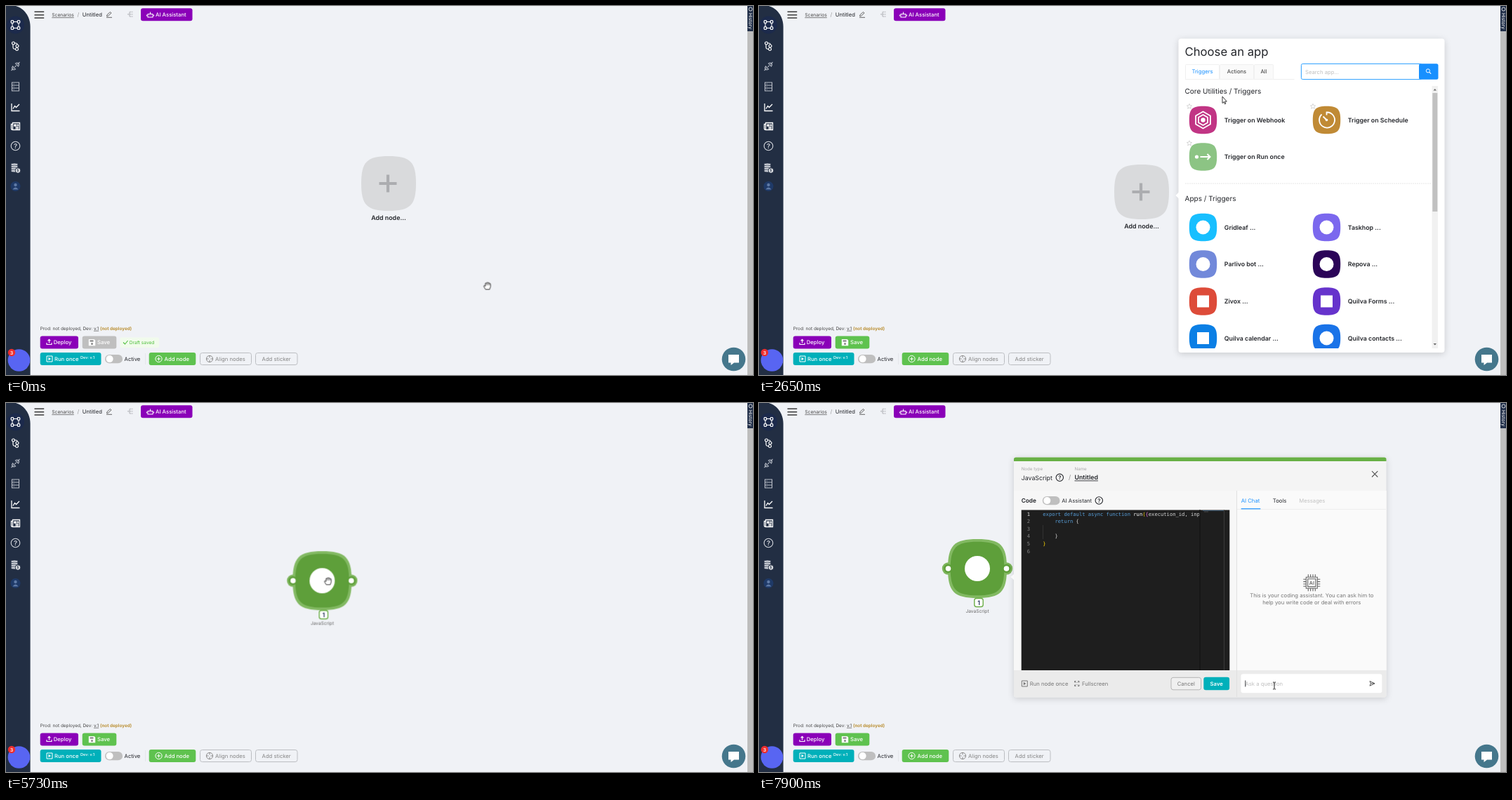
An HTML page for the animation above (8000 ms loop, 1064 px wide and 526 px high).

```html
<!DOCTYPE html>
<html lang="en">
<head>
<meta charset="utf-8">
<title>Scenario editor</title>
<style>
html, body { margin: 0; width: 100%; height: 100%; overflow: hidden; background: #f0f2f6; }
svg { display: block; width: 1064px; height: 526px; font-family: Inter, Roboto, sans-serif; text-rendering: geometricPrecision; }
.card { filter: drop-shadow(0 2px 5px rgba(0, 0, 0, .16)); }
.focus { filter: drop-shadow(0 0 1px rgba(24, 144, 255, .3)); }
.mono { font-family: "DejaVu Sans Mono", "Noto Sans Mono", monospace; white-space: pre; }
#picker { transform-origin: 597px 270px; }
#dialog { transform-origin: 363px 248px; }
</style>
</head>
<body>
<svg id="stage" viewBox="0 0 1064 526"></svg>
<script>
const LOOP = 8000;
const INK = '#24262b', BLUE = '#1890ff', GREEN = '#5fc24f', PURPLE = '#8a00b8', TEAL = '#00b0ba', GREY = '#bfbfbf';
const BOLD = 'font-weight="600"', MEDIUM = 'font-weight="500"', MIDDLE = 'text-anchor="middle"';

// Drawing helpers; text is placed by the middle of its capitals.
const text = (x, y, s, size = 7.7, fill = INK, more = '') =>
  `<text x="${x}" y="${y + size * .36}" font-size="${size}" fill="${fill}" ${more}>${s}</text>`;
const rect = (x, y, w, h, fill, r = 0, more = '') =>
  `<rect x="${x}" y="${y}" width="${w}" height="${h}" rx="${r}" fill="${fill}" ${more}/>`;
const circle = (x, y, r, fill, more = '') => `<circle cx="${x}" cy="${y}" r="${r}" fill="${fill}" ${more}/>`;
const line = (d, color, width = 1, more = '') =>
  `<path d="${d}" fill="none" stroke="${color}" stroke-width="${width}" ${more}/>`;
const at = (x, y, s, id = '') => `<g ${id && `id="${id}"`} transform="translate(${x} ${y})">${s}</g>`;
const group = (id, s) => `<g id="${id}">${s}</g>`;
const squircle = (r, fill, more = '') => {
  const k = r * .79;
  return `<path d="M${-r} 0C${-r} ${-k} ${-k} ${-r} 0 ${-r}S${r} ${-k} ${r} 0 ${k} ${r} 0 ${r} ${-r} ${k} ${-r} 0" fill="${fill}" ${more}/>`;
};
const hexagon = r => 'M' + [0, 1, 2, 3, 4, 5].map(i => {
  const a = (i + .5) * Math.PI / 3;
  return `${(r * Math.cos(a)).toFixed(2)} ${(r * Math.sin(a)).toFixed(2)}`;
}).join('L') + 'Z';
const chip = (color, width = 1.2) => {
  let pins = '';
  for (const p of [-5, -1.7, 1.7, 5]) pins += `M${p} -12V-8M${p} 8V12M-12 ${p}H-8M8 ${p}H12`;
  return line(pins + 'M-8-8H8V8H-8ZM-5.6-5.6H5.6V5.6H-5.6Z', color, width) +
    text(0, 0, 'AI', 7, color, MIDDLE + BOLD);
};
const help = (x, y, r, color) =>
  circle(x, y, r, 'none', `stroke="${color}" stroke-width="1.1"`) + text(x, y, '?', r * 1.5, color, MIDDLE + BOLD);

const icons = {
  hook: line(hexagon(12) + hexagon(7.5), '#fff', 1.8) + circle(0, 0, 3.2, '#fff'),
  clock: line('M-7-8A11 11 0 1 0 0-11V-7M0 0L-5-5', '#fff', 1.8) + circle(0, 0, 1.8, '#fff'),
  arrow: circle(-9, 0, 2.6, '#fff') + line('M-4 0H10M6-4L10 0 6 4', '#fff', 2),
  browser: line('M-12.5-11.5H12.5V11.5H-12.5ZM-12.5-6H12.5M-10-8.8H-8M-6-8.8H-4M-4-1L-7.5 2.5-4 6M4-1L7.5 2.5 4 6M1.5-2L-1.5 7', '#fff', 1.3),
  code: line('M-4-5.5L-9.5 0-4 5.5M4-5.5L9.5 0 4 5.5', '#fff', 1.8),
  chip: chip('#fff'),
  dot: circle(0, 0, 10, '#fff'),
  box: rect(-8.5, -8.5, 17, 17, '#fff')
};
const star = (x, y) =>
  at(x, y, line('M0-3.6L1.1-1.2 3.6-1 1.7.7 2.3 3.3 0 1.9-2.3 3.3-1.7.7-3.6-1-1.1-1.2Z', '#c4c4c4', .7));
const COLS = [632.5, 808.5], ROWS = [162.5, 215, 315.5, 368, 421, 473.5];
const app = (x, y, color, icon, label, starred, id = '') => {
  const lines = label.split('|');
  return at(x, y, squircle(19.7, color) + icons[icon]) + (starred ? star(x - 19.5, y - 19.5) : '') +
    `<g ${id && `id="${id}"`} fill="${INK}">` +
    lines.map((s, i) => text(x + 30.3, y + (i - (lines.length - 1) / 2) * 11.5, s, 8.8, 'inherit', BOLD)).join('') + '</g>';
};

function popup(id, top, bottom, right, title, hint, tab, focused, body) {
  const y = top + 36.5, tabs = [['Triggers', 607, 49], ['Actions', 656, 49], ['All', 705, 28]];
  return group(id,
    rect(597.5, top, right - 597.5, bottom - top, '#fff', 4, 'class="card"') +
    '<path d="M593.5 270L598 265.5V274.5Z" fill="#fff"/>' +
    text(606.5, top + 18.5, title, 16.7) +
    line(`M607 ${y + 21.5}H${right - 214}`, '#efefef') +
    tabs.map(([s, x, w], i) =>
      rect(x + .5, y + .5, w - 1, 21, i == tab ? '#fff' : '#fafafa', 1, 'stroke="#f0f0f0"') +
      text(x + w / 2, y + 10.7, s, 7.7, i == tab ? BLUE : '#333', MIDDLE)).join('') +
    rect(right - 204, y - .5, 171, 22, '#fff', 2, focused ? 'stroke="#40a9ff" class="focus"' : 'stroke="#d5d5d5"') +
    text(right - 198.5, y + 10.8, hint, 7.7, '#bfbfbf') +
    rect(right - 36.5, y - .8, 27.5, 22.5, BLUE, 2.5) +
    at(right - 23, y + 10, circle(-.6, -.6, 2.6, 'none', 'stroke="#fff"') + line('M1.3 1.3L3.7 3.7', '#fff', 1.2)) + body);
}

function catalogue(id, kind, tab, thumb, focused, apps) {
  return popup(id, 46.5, 494, 976.5, 'Choose an app', 'Search app...', tab, focused,
    text(606.5, 121.5, 'Core Utilities / ' + kind, 10) + text(606.5, 274.5, 'Apps / ' + kind, 10) +
    line('M607 253H957', '#e6e6e6', 1, 'stroke-dasharray="2 1"') +
    rect(958.5, 114, 8.5, 374, '#f1f1f1') + rect(959.3, 124, 7, thumb, '#c1c1c1') +
    '<path d="M960.5 120.5H965L962.8 118ZM960.5 481H965L962.8 483.5Z" fill="#666"/>' +
    '<g clip-path="url(#list)">' +
    apps.map(([c, r, ...rest]) => app(COLS[c], ROWS[r], ...rest)).join('') + '</g>');
}

const triggers = catalogue('triggers', 'Triggers', 0, 169, true, [
  [0, 0, '#c13584', 'hook', 'Trigger on Webhook', 1],
  [1, 0, '#c08a35', 'clock', 'Trigger on Schedule', 1],
  [0, 1, '#8cc484', 'arrow', 'Trigger on Run once', 1],
  [0, 2, '#18bfff', 'dot', 'Gridleaf ...'],
  [1, 2, '#7b68ee', 'dot', 'Taskhop ...'],
  [0, 3, '#7289da', 'dot', 'Parlivo bot ...'],
  [1, 3, '#2b0458', 'dot', 'Repova ...'],
  [0, 4, '#dd4b39', 'box', 'Zivox ...'],
  [1, 4, '#6633cc', 'box', 'Quilva Forms ...'],
  [0, 5, '#0b7fe5', 'box', 'Quilva calendar ...'],
  [1, 5, '#1a73e8', 'dot', 'Quilva contacts ...']
]);
const DARK = '#06444d', LEAF = '#68b045';
const actions = catalogue('actions', 'Actions', 1, 97, false, [
  [0, 0, '#c13584', 'hook', 'Webhook response', 1],
  [1, 0, LEAF, 'browser', 'Code ...', 0, 'codeLabel'],
  [0, 1, LEAF, 'code', 'Other tools ...'],
  [0, 2, DARK, 'chip', 'AI Talkivo Alternatives|...'],
  [1, 2, '#76b900', 'dot', 'AI Speech-To-Text ...'],
  [0, 3, DARK, 'chip', 'AI Tools ...'],
  [1, 3, DARK, 'chip', 'AI: Automatic Speech|Recognition ...'],
  [0, 4, DARK, 'chip', 'AI: Image Classification|...'],
  [1, 4, DARK, 'chip', 'AI: Image To Text ...'],
  [0, 5, DARK, 'chip', 'AI: Object Detection ...'],
  [1, 5, DARK, 'chip', 'AI: Summarization ...']
]);
const codeApps = popup('codeApps', 162.8, 378, 967, 'Code', 'Search in Code...', 1, true,
  line('M615.5 239.5H608.5M611.5 236L608 239.5 611.5 243', INK) + text(618.5, 239.5, 'Back') +
  text(606.5, 256.3, 'Actions', 9.9) + line('M607 334.5H958', '#ececec') +
  app(COLS[0], 297, LEAF, 'browser', 'Headless browser', 1) +
  app(COLS[1], 297, LEAF, 'dot', 'JavaScript', 1, 'jsLabel'));

const play = (x, y, c) => at(x, y, line('M-4-4H4V4H-4Z', c) + `<path d="M-1.5-2.2L2 0-1.5 2.2Z" fill="${c}"/>`);
const sidebar =
  '<path d="M0 0H14C25 3 34.6 14 34.6 30V526H0Z" fill="#222e43"/>' + circle(13.5, 27, 12.5, '#1c2a4c') +
  at(13.5, 27, line('M-3-4.5H3M-3 4.5H3M-4.5-3V3M4.5-3V3', '#fff', 1.1) +
    [[-4.5, -4.5], [4.5, -4.5], [-4.5, 4.5], [4.5, 4.5]].map(([x, y]) =>
      rect(x - 1.8, y - 1.8, 3.6, 3.6, 'none', 1, 'stroke="#fff" stroke-width="1.2"')).join('')) +
  at(13, 57, [[-2.5, -4], [3, 0], [2.5, 4.5]].map(([x, y]) =>
    circle(x, y, 2, 'none', 'stroke="#fff" stroke-width="1.2"')).join('') + line('M-.5-4H1Q3-4 3-2M-3-2V2Q-3 4.5.5 4.5', '#fff', 1.2)) +
  at(13.5, 86, line('M-6 6L-3 3M6-6L3-3M-4 0L0 4-2 5Q-5 5-5 2ZM4 0L0-4 2-5Q5-5 5-2ZM-1 1L1-1', '#aeb4bf', 1.1)) +
  at(13.5, 115, line('M-5-6H5V6H-5ZM-5-2H5M-5 2H5M-3-4H-2M-3 0H-2M-3 4H-2', '#b8bdc7', 1.1)) +
  at(13.5, 144.5, line('M-5.5-5.5V5H6M-3.5 2L-1-2 1 0 5.5-4.5', '#fff', 1.3)) +
  at(13.5, 171.5, line('M-4-5H6V5H-4ZM-4-3H-6V3Q-6 5-4 5M0 1.5H4.5M0 3.3H4.5', '#fff', 1.3) + rect(-2.3, -3, 4, 3.2, '#fff') + rect(2.6, -3, 2, 3, '#fff')) +
  help(13.5, 199.5, 6.3, '#d6d9df') +
  at(13.5, 231, [-5, -2, 1, 4].map(y => `<ellipse cx="-1.5" cy="${y}" rx="5" ry="1.9" fill="#c9cdd5" stroke="#222e43" stroke-width=".6"/>`).join('') +
    circle(3.5, 3.5, 3.8, '#e3e5e9', 'stroke="#222e43"') + text(3.5, 3.5, '$', 5, '#222e43', MIDDLE + BOLD)) +
  circle(13.5, 257, 7, '#1f3a68') + circle(13.5, 255, 2.2, '#5f7aa6') + '<path d="M9.5 261.5Q13.5 255.5 17.5 261.5Z" fill="#5f7aa6"/>' +
  circle(18.5, 505, 15.8, '#5865f2') + circle(8, 494, 5.2, '#ee2d2d') + text(8, 494, '3', 7, '#fff', MIDDLE + BOLD);

const header =
  line('M40.5 8.3H54.2M40.5 12.7H54.2M40.5 17H54.2', '#3c3c3c', 1.5) +
  text(65.3, 13, 'Scenarios', 6.7, '#444', 'text-decoration="underline"') + text(101.5, 12.7, '/', 7.7, '#999') +
  text(108.7, 12.7, 'Untitled') +
  line('M143.5 14.5L144 12.5 148.5 8.5 150 10 145.5 14.2ZM143 16.3H151', '#555', .9) +
  line('M173 11.7H176M176 8.5V15M176 8.5H178M176 11.7H178M176 15H178M178.5 8.5H180.5M178.5 11.7H180.5M178.5 15H180.5', '#c3c5ca', 1.5) +
  rect(192, 3.2, 73.5, 18, PURPLE, 3) +
  at(205.5, 12.5, line('M-3.5-1H3.5V3.5H-3.5ZM0-1V-4M-5 0V2M5 0V2M-1.5 1H-1M1 1H1.5', '#fff', 1.1)) +
  text(213, 12.5, 'AI Assistant', 7.7, '#fff', MEDIUM) +
  rect(1056, 0, 8, 526, '#bdbdbd') + rect(1056, 0, 8, 36, '#22304a') +
  `<g transform="translate(1060.5 0) rotate(90)">${text(10, 0, 'History', 6.8, '#fff')}${circle(4.5, 0, 2.5, 'none', 'stroke="#fff" stroke-width=".8"')}</g>`;

const footer =
  text(48.7, 459.5, 'Prod: not deployed, Dev: <tspan text-decoration="underline">v.1</tspan> <tspan font-weight="600" fill="#b5851f">(not deployed)</tspan>', 6.4, '#444') +
  rect(48.7, 470.5, 54.3, 18, PURPLE, 3) +
  at(61.5, 479, line('M-3.5 1V3.5H3.5V1M0 1.5V-3.5M-2-1.7L0-3.7 2-1.7', '#fff', 1.1)) + text(67.8, 479.7, 'Deploy', 7.7, '#fff', MEDIUM) +
  `<rect id="save" x="108.7" y="470.5" width="48.6" height="18" rx="3" fill="${GREY}"/>` +
  at(122.5, 479.6, '<path d="M-4.7-4.7H3L4.7-3V4.7H-4.7Z" fill="#fff"/><path d="M-3-3.3H2V-1H-3Z" fill="#888"/>' + circle(0, 2, 1.5, '#888')) +
  text(130, 479.7, 'Save', 7.7, '#fff', MEDIUM) +
  group('draft', rect(162.5, 472.5, 55.5, 14.5, '#f1fbec', 2) + line('M167 479.5L169.5 482 173.5 477', '#4fbf3c', 1.1) + text(175.7, 479.7, 'Draft saved', 6.6, '#4fbf3c')) +
  rect(48.7, 494, 86.8, 18, TEAL, 3) + play(62, 503, '#fff') + text(69, 503.5, 'Run once', 7.7, '#fff', MEDIUM) +
  text(106, 501, 'Dev: v.1', 5.6, '#fff', MEDIUM) +
  rect(141, 497, 25, 12.3, GREY, 6.15) + circle(147.6, 503.1, 5, '#fff') + text(168.6, 503.2, 'Active') +
  line('M198.5 495V511', '#e4e6ea') +
  rect(203.7, 494, 66.6, 18, GREEN, 3) + circle(217.5, 503, 4.6, 'none', 'stroke="#fff"') + line('M215 503H220M217.5 500.5V505.5', '#fff') +
  text(225.5, 503.2, 'Add node', 7.7, '#fff', MEDIUM) +
  rect(276.5, 494.5, 73, 17, 'none', 3, 'stroke="#bcbec2"') + circle(290, 503, 4.6, 'none', 'stroke="#888"') +
  line('M290 498.5V501.5M290 504.5V507.5M285.5 503H288.5M291.5 503H294.5', '#888') + text(298, 503.2, 'Align nodes', 7.7, '#858585') +
  rect(355.5, 494.5, 59.5, 17, 'none', 3, 'stroke="#bcbec2"') + text(364.6, 503.2, 'Add sticker', 7.7, '#858585') +
  circle(1036.5, 503.5, 16.8, '#45778c') + '<path d="M1029 497H1044V508.5H1037L1032.5 512V508.5H1029Z" fill="#fff"/>';

const addNode = group('addNode', at(545, 253,
  group('addHover', squircle(39, 'none', 'stroke="#e1e2e3" stroke-width="4"')) + squircle(39, '#d9dadc') +
  line('M-1-12.5V12.5M-13.5 0H11.5', '#acadb0', 4.2) +
  text(0, 48.8, 'Add node...', 8.9, INK, MIDDLE + BOLD)));

const jsNode = group('jsNode',
  circle(-41.5, 0, 8.7, '#7db55b') + circle(41.5, 0, 8.7, '#7db55b') +
  squircle(42, '#82b962') + squircle(38.3, '#5e9f3a') +
  circle(-41.5, 0, 6.2, '#5e9f3a') + circle(41.5, 0, 6.2, '#5e9f3a') +
  circle(-41.5, 0, 3.8, '#fff') + circle(41.5, 0, 3.8, '#fff') + circle(0, 0, 18, '#fff') +
  rect(-4.2, 42.5, 12.4, 12, '#fff', 3, 'stroke="#6cae48" stroke-width="1.4"') +
  text(2, 48.6, '1', 8.8, '#1c2b50', MIDDLE + BOLD) + text(0, 61, 'JavaScript', 6.6, '#666', MIDDLE));

const span = (color, s) => `<tspan fill="${color}">${s}</tspan>`;
const source = [
  span('#569cd6', 'export default async function ') + span('#fff', 'run') + span('#ffd700', '(') + span('#da70d6', '{') + 'execution_id, inp',
  '    ' + span('#569cd6', 'return') + ' {', '', '    }', span('#ffd700', '}'), ''
];
const dialog = group('dialog',
  '<g class="card">' + rect(363, 77.5, 530.5, 342, '#f4f4f4', 3) + '</g>' +
  '<path d="M363 83V80Q363 77.5 366 77.5H890.5Q893.5 77.5 893.5 80V83Z" fill="#68b045"/>' +
  '<path d="M358.5 248L363.5 243.5V252.5Z" fill="#fafafa"/>' +
  rect(363, 125, 530.5, 256, '#f7f7f7') + rect(681, 125, 212.5, 256, '#fafafa') +
  '<path d="M363 381H893.5V416.5Q893.5 419.5 890.5 419.5H366Q363 419.5 363 416.5Z" fill="#ebebeb"/>' +
  line('M680.5 125V419', '#e0e0e0') + line('M681 151.5H893', '#eee') +
  text(373.7, 93.7, 'Node type', 6.2, '#aaa') + text(449.5, 93.7, 'Name', 6.2, '#aaa') +
  text(373.7, 106.5, 'JavaScript', 8.8) + help(428.3, 106.3, 5.2, INK) + text(441, 106.3, '/', 8.8, '#888') +
  text(449.5, 106.3, 'Untitled', 8.8, INK, BOLD + ' text-decoration="underline"') +
  line('M873 97.2L881.3 105.5M881.3 97.2L873 105.5', '#555', 1.1) +
  text(373.7, 139.2, 'Code', 8.3, INK, BOLD) + rect(403.8, 133, 24.7, 12.3, GREY, 6.15) + circle(410.3, 139.1, 5, '#fff') +
  text(431.3, 139.2, 'AI Assistant') + help(484.3, 139, 5.2, INK) +
  rect(373.7, 152.5, 296.6, 228.5, '#1e1e1e') + line('M628 152.5V381', '#171717', 2) + line('M662.5 152.5V381', '#3a3a3a') +
  line('M404.5 174V194', '#404040', .6) + line('M632 153.5H662', '#365a78', .8) + line('M634 155H640', '#555', .8) +
  '<g clip-path="url(#editor)">' + source.map((s, i) => {
    const y = 158 + i * 10.6;
    return text(386, y, i + 1, 7.15, i ? '#858585' : '#e0e0e0', 'class="mono" text-anchor="end"') +
      text(404.3, y, s, 7.15, '#d4d4d4', 'class="mono"');
  }).join('') + '</g>' +
  play(378.3, 400, '#777') + text(385.7, 400.2, 'Run node once', 7.7, '#777') +
  line('M449.5 398.5V396.5H451.5M454 396.5H456V398.5M456 401.5V403.5H454M451.5 403.5H449.5V401.5M450 397L452 399M455.5 397L453.5 399M450 403L452 401M455.5 403L453.5 401', '#777', .9) +
  text(460, 400.2, 'Fullscreen', 7.7, '#777') +
  rect(587, 391.3, 42.6, 17.5, '#f0f0f0', 3, 'stroke="#b5b5b5"') + text(608.3, 400.2, 'Cancel', 7.7, '#777', MIDDLE) +
  rect(633.3, 390.8, 36.8, 18.4, TEAL, 3) + text(651.7, 400.2, 'Save', 7.7, '#fff', MIDDLE + BOLD) +
  text(686.7, 139, 'AI Chat', 7.7, BLUE) + text(731.8, 139, 'Tools') + text(769.3, 139, 'Messages', 7.7, '#c2c2c2') +
  line('M686.7 150.8H714.3', BLUE, 1.2) + at(787.3, 256.3, chip('#666', 1.1)) +
  text(787.3, 274, 'This is your coding assistant. You can ask him to', 7.7, '#777', MIDDLE) +
  text(787.3, 284.3, 'help you write code or deal with errors', 7.7, '#777', MIDDLE) +
  rect(686.5, 386.3, 200.8, 27, '#fff', 3) + text(692.5, 400.2, 'Ask a question', 7.7, GREY) +
  line('M870 396.5L877 399.8 870 403.2 871.3 399.8ZM871.3 399.8H877', '#444', .9));

const hand = d => `<path d="${d}" fill="#fff" stroke="#222" stroke-width=".9" stroke-linejoin="round"/>`;
const cursor = group('cursor',
  group('click', circle(0, 0, 6, '#e0d800', 'opacity=".6"')) +
  group('grab', hand('M-2.5 5.5L-4.8 1.5Q-5.3 0-4 0L-2.8 1V-3Q-2-4.7-1-3.2-.3-5.8 1-3.6 2.3-5.2 3-3 4.7-3.5 4.7-1.5V1.5L3.3 5.5Z') +
    line('M-1-3.2V-.5M1-3.6V-.5M3-3V-.5', '#222', .7)) +
  group('arrow', hand('M0 0V9.5L2.1 7.6 3.5 10.8 4.9 10.1 3.5 7.1H6.3Z')) +
  group('pointer', hand('M0 12.5L-2.5 8.5Q-2.5 6.8-.8 8V1Q0-.8 1 1V4.5Q2.2 3.7 2.8 5 4 4.3 4.6 5.5 6.4 5 6.4 7V9.5L5.3 12.5Z')) +
  group('beam', line('M-2-4.5Q0-4.5 0-3.5 0-4.5 2-4.5M0-3.5V4.5M-2 5.5Q0 5.5 0 4.5 0 5.5 2 5.5', '#222', 1)));

const $ = id => document.getElementById(id);
$('stage').innerHTML =
  '<clipPath id="list"><path d="M598 114H958V488H598Z"/></clipPath>' +
  '<clipPath id="editor"><path d="M374 152H627.5V381H374Z"/></clipPath>' +
  sidebar + header + footer + addNode + jsNode +
  group('picker', triggers + actions + codeApps + group('searchCaret', line('M778 89.5V98.5', INK, .8))) +
  dialog + group('askCaret', line('M692.8 395.5V404.5', INK, .9)) + cursor;

// Each step is [ms, styles, easing to the next step].
function animate(id, steps) {
  const frames = steps.map(([ms, style, easing = 'linear']) => ({ ...style, offset: ms / LOOP, easing }));
  frames.push({ ...steps.at(-1)[1], offset: 1 });
  $(id).animate(frames, { duration: LOOP, iterations: Infinity });
}
const show = (id, ...spans) => animate(id, [
  ...(spans[0][0] ? [[0, { opacity: 0 }, 'step-end']] : []),
  ...spans.flatMap(([from, to]) => [[from, { opacity: 1 }, 'step-end'], ...(to < LOOP ? [[to, { opacity: 0 }, 'step-end']] : [])])
]);
const move = (id, steps) => animate(id, steps.map(([ms, x, y, ease = 'ease-in-out']) =>
  [ms, { transform: `translate(${x}px, ${y}px)` }, ease]));
const highlight = (id, from) => animate(id, [[0, { fill: INK }], [from, { fill: INK }], [from + 60, { fill: BLUE }]]);

const CLOSED = { opacity: 0, transform: 'scale(.8)' }, OPEN = { opacity: 1, transform: 'scale(1)' };
const ZOOM_IN = 'cubic-bezier(.08,.82,.17,1)', ZOOM_OUT = 'cubic-bezier(.6,.04,.98,.34)';
animate('picker', [[0, CLOSED], [1840, CLOSED, ZOOM_IN], [2040, OPEN], [5130, OPEN, ZOOM_OUT], [5270, CLOSED]]);
animate('dialog', [[0, CLOSED], [6480, CLOSED, ZOOM_IN], [6680, OPEN]]);
animate('save', [[0, { fill: GREY }], [1750, { fill: GREY }, 'ease-in-out'], [2050, { fill: GREEN }]]);

show('draft', [0, 1750]);
show('triggers', [1840, 2900]);
show('actions', [2900, 4170]);
show('codeApps', [4170, 5290]);
show('searchCaret', [1850, 2380]);
show('askCaret', [7760, LOOP]);
show('addNode', [0, 5230]);
show('addHover', [1400, 2050]);
show('jsNode', [5230, LOOP]);
highlight('codeLabel', 3560);
highlight('jsLabel', 4850);

move('addNode', [[0, 0, 0, 'step-end'], [1750, 0, 12]]);
move('jsNode', [[0, 545, 265], [5500, 545, 265], [6020, 311, 236]]);
move('cursor', [
  [0, 685.5, 398.5], [30, 685.5, 398.5], [130, 682.5, 395], [1000, 682.5, 395], [1550, 541, 264],
  [1950, 541, 264], [2470, 657, 136], [2650, 660, 129], [2850, 681, 95], [3340, 681, 95],
  [3620, 793, 153], [3800, 793, 153], [4090, 799, 172], [4490, 799, 172], [4900, 822, 288],
  [5080, 822, 288], [5290, 617, 275], [5450, 553, 265], [5500, 553, 265], [6020, 319.5, 236.5],
  [6560, 319.5, 236.5], [6930, 705, 362], [7300, 742, 397], [7620, 734, 402.5]
]);
show('grab', [0, 2130], [5200, 6620]);
show('arrow', [2130, 2770], [3420, 3560], [4200, 4830], [6620, 7230]);
show('pointer', [2770, 3420], [3560, 4200], [4830, 5200]);
show('beam', [7230, LOOP]);
show('click', [1690, 1800], [2860, 2960], [4150, 4250], [4990, 5090], [6140, 6260], [7760, 7860]);
</script>
</body>
</html>
```
